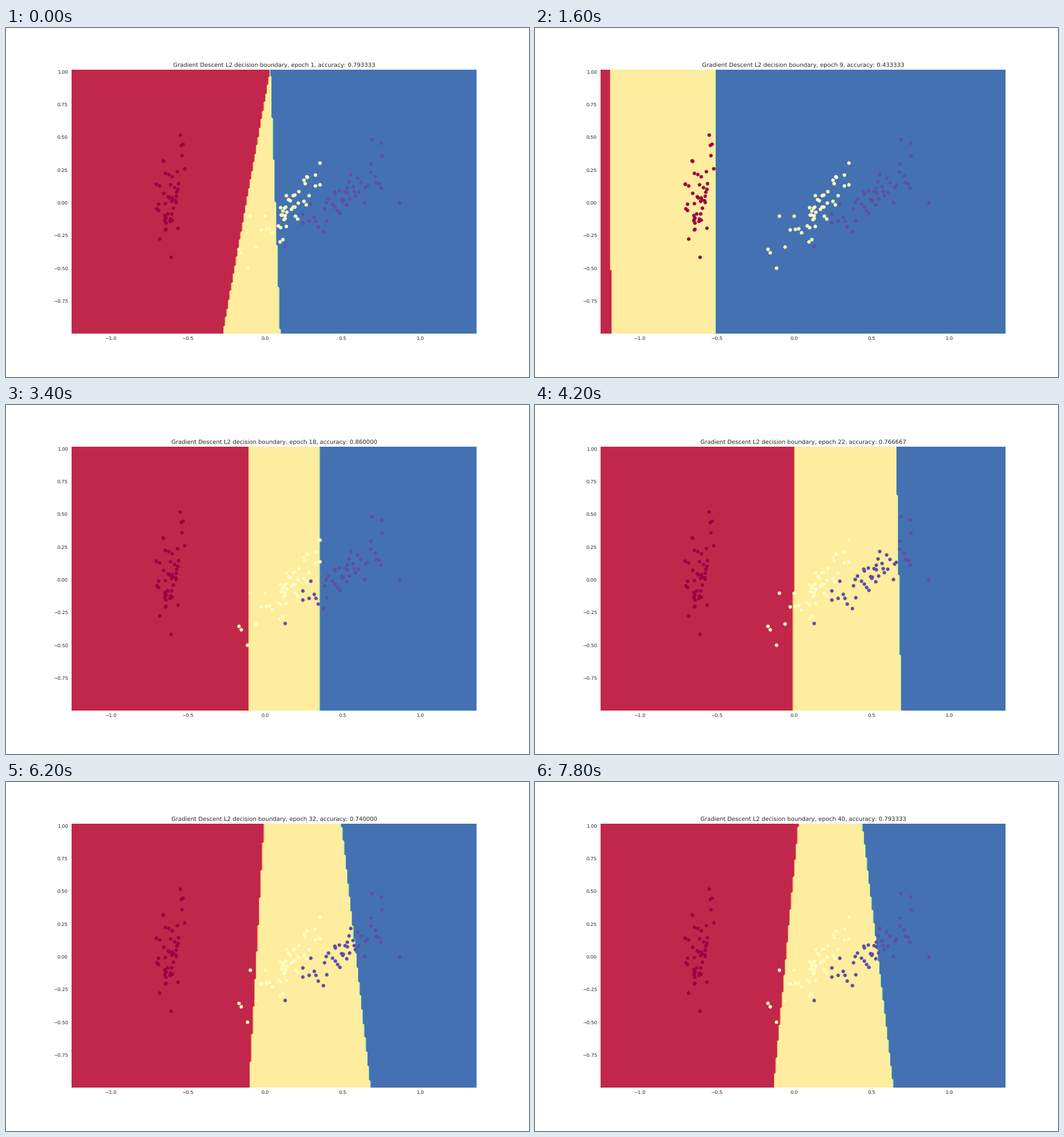
Recreate the animation shown at these times as a matplotlib script. Size 917 by 611 pixels, loop 8000 ms.

```python
import numpy as np
import matplotlib.pyplot as plt
from matplotlib.animation import FuncAnimation

W, H, DPI = 917, 611, 64
FRAMES, STEP = 40, 200
PT = 72 / DPI          # points per pixel
XMIN, XMAX, YMIN, YMAX = -1.252, 1.368, -0.994, 1.018

plt.rcParams.update({
    "font.family": "DejaVu Sans",
    "text.color": "#262626",
    "text.hinting": "no_hinting",
    "text.kerning_factor": 6,
    "xtick.color": "#262626",
    "ytick.color": "#262626",
})

# Each pose: epoch, left line (top, bottom), right line (top, bottom),
# hits out of 150, and the easing power used on the way to it.
POSES = [
    (1, .036, -.271, .0367, .0991, 119, 1),
    (9, -1.1858, -1.1808, -.506, -.506, 65, 5),
    (11, -.15, -.15, .765, .765, 105, .5),
    (18, -.108, -.108, .353, .353, 129, .5),
    (22, .003, -.006, .662, .695, 115, 1),
    (26, -.02, -.06, 1.10, 1.42, 101, 5),
    (28, -.027, -.090, .500, .646, 111, .5),
    (36, .017, -.113, .492, .721, 111, 1),
    (40, .030, -.130, .442, .645, 119, 1),
]

rng = np.random.default_rng(4)


def cloud(n, center, spread, slope, noise, outliers):
    """Sloping cluster of n points plus a few far ones."""
    dx, dy = np.clip(rng.normal(size=(2, n)), -1.9, 1.9)
    x = center[0] + spread * dx
    y = center[1] + slope * spread * dx + noise * dy
    return np.vstack([np.column_stack([x, y]), outliers])


CLASSES = {
    "#9e0142": cloud(46, (-.613, .07), .048, 1.0, .16,
                     [(-.55, .52), (-.61, -.41)]),
    "#ffffbf": cloud(45, (.115, -.085), .125, .95, .10,
                     [(-.17, -.35), (-.155, -.375), (-.115, -.494)]),
    "#5e4fa2": cloud(45, (.50, .025), .135, .68, .085,
                     [(.87, .005), (.69, .488), (.75, .46), (.13, -.33)]),
}

X, Y = np.meshgrid(np.linspace(XMIN, XMAX, 263), np.linspace(YMIN, YMAX, 202))
DEPTH = (YMAX - Y) / (YMAX - YMIN)

fig = plt.figure(figsize=(W / DPI, H / DPI), dpi=DPI, facecolor="white")
ax = fig.add_axes([0.125, 0.125, 0.775, 0.755])
ax.set_xlim(XMIN, XMAX)
ax.set_ylim(YMIN, YMAX)
ax.set_xticks(np.arange(-1, 1.1, 0.5))
ax.set_yticks(np.arange(-0.75, 1.01, 0.25))
ax.tick_params(length=0, pad=5.95 * PT, labelsize=8.49 * PT)
for spine in ax.spines.values():
    spine.set_visible(False)

for color, dots in CLASSES.items():
    ax.scatter(*dots.T, s=(6 * PT) ** 2, c=color, linewidths=0.25,
               edgecolors="face", zorder=3)

title = ax.set_title("", fontsize=10.19 * PT, pad=5.1 * PT)
bands = []


def pose(epoch):
    for a, b in zip(POSES, POSES[1:]):
        if epoch <= b[0]:
            break
    t = ((epoch - a[0]) / (b[0] - a[0])) ** b[-1]
    return [p + (q - p) * t for p, q in zip(a[1:-1], b[1:-1])]


def draw(i):
    epoch = i + 1
    left_top, left_end, right_top, right_end, hits = pose(epoch)
    left = left_top + (left_end - left_top) * DEPTH
    right = right_top + (right_end - right_top) * DEPTH
    label = (X > left).astype(float) + (X > right)
    while bands:
        bands.pop().remove()
    bands.append(ax.contourf(X, Y, label, levels=np.linspace(0, 2, 9),
                             cmap="Spectral", vmin=0, vmax=2, zorder=1))
    title.set_text(f"Gradient Descent L2 decision boundary, epoch {epoch}, "
                   f"accuracy: {round(hits) / 150:.6f}")
    return [title]


anim = FuncAnimation(fig, draw, frames=FRAMES, interval=STEP,
                     init_func=lambda: draw(0), repeat=True, repeat_delay=0,
                     blit=False)
plt.show()
```
